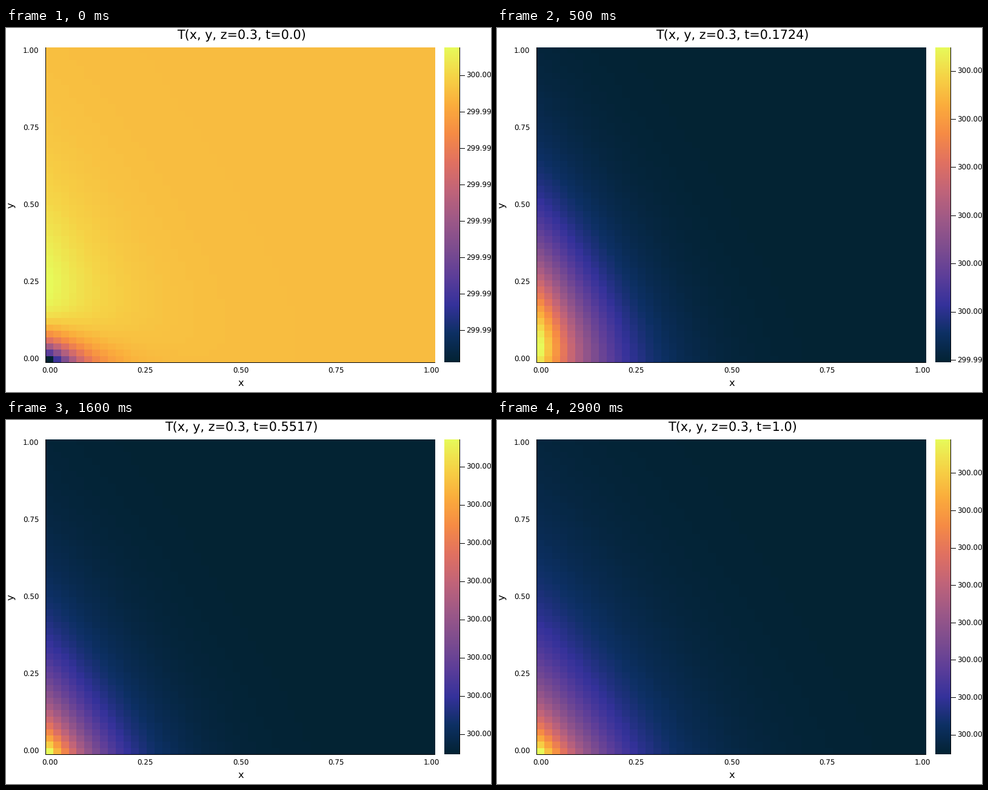
Animation, 800 px wide and 600 px high, one loop 3000 ms. Source, as a matplotlib script:

```python
import numpy as np
import matplotlib.pyplot as plt
from matplotlib.animation import FuncAnimation
from matplotlib.colors import LinearSegmentedColormap

W, H, DPI = 800, 600, 100
FRAMES, CELLS = 30, 50
LEFT, RIGHT, TOP, BOTTOM = 65, 708, 32, 551
BAR_LEFT, BAR_RIGHT = 723, 748

plt.rcParams["font.family"] = "DejaVu Sans"
plt.rcParams["text.hinting"] = "no_hinting"
THERMAL = LinearSegmentedColormap.from_list("thermal", [
    "#032333", "#0d3064", "#35329b", "#5d3e99", "#7e4d8f", "#9e5987",
    "#c16479", "#e17161", "#f68b45", "#fbad3c", "#f6d346", "#e7fa5a"])

# Colorbar ticks: pixel row of the lowest "300.00" tick and tick spacing
KEY_STEPS = [0, 2, 5, 11, 16, 24, 29]
KEY_ROWS = [78, 220, 468, 512, 518, 520, 519]
KEY_GAPS = [60.1, 71.9, 79.4, 74.1, 63, 59.8, 61.6]

grid = np.linspace(0, 1, CELLS)
X, Y = np.meshgrid(grid, grid)


def radius(kx, ky, p=1.14):
    return ((kx * X) ** p + (ky * Y) ** p) ** (1 / p)


def temperature(t):
    """Broad warm zone minus a cold corner that fades, scaled to 0..1."""
    spread = t ** 1.5
    cold = 2.43 * np.exp(-5.9 * t) - 0.35
    warm = np.exp(-radius(9.1 - 3.1 * spread, 4.8 - 1.3 * spread))
    field = warm - cold * np.exp(-radius(11.5, 11.5))
    return (field - field.min()) / np.ptp(field)


fig = plt.figure(figsize=(W / DPI, H / DPI), dpi=DPI, facecolor="white")
ax = fig.add_axes([0, 0, 1, 1])
ax.axis("off")


def text(x, y, s, px, **kw):
    return ax.text(x, y, s, fontsize=px * 72 / DPI, color="black",
                   va="baseline", **kw)


def line(xs, ys):
    return ax.plot(xs, ys, color="black", lw=0.72, snap=False,
                   solid_capstyle="butt")[0]


def image(data, left, right):
    return ax.imshow(data, cmap=THERMAL, vmin=0, vmax=1, origin="lower",
                     extent=(left, right, BOTTOM, TOP), aspect="auto",
                     interpolation="nearest")


heat = image(temperature(0), LEFT, RIGHT)
image(np.linspace(0, 1, 256)[:, None], BAR_LEFT, BAR_RIGHT)
ax.set_xlim(0, W)
ax.set_ylim(H, 0)

line([65.5, 65.5], [TOP, BOTTOM + 1])
line([LEFT, RIGHT], [551.5, 551.5])
line([748.5, 748.5], [TOP, BOTTOM])

for v in np.linspace(0, 1, 5):
    text(72.2 + 629.6 * v, 569, f"{v:.2f}", 11.9, ha="center")
    text(54.5, 550.3 - 508 * v, f"{v:.2f}", 11.9, ha="right")
text(387, 590.5, "x", 16.35, ha="center")
text(13, 292, "y", 16.35, ha="center", rotation=90, rotation_mode="anchor")
title = text(388, 18.5, "", 20.8, ha="center")

ticks = [(line([748, 757], [0, 0]), text(759, 0, "", 11.9, ha="left"))
         for _ in range(10)]


def update(i):
    t = i / (FRAMES - 1)
    heat.set_data(temperature(t))
    title.set_text(f"T(x, y, z=0.3, t={round(t, 4)})")

    base = np.interp(i, KEY_STEPS, KEY_ROWS)
    gap = np.interp(i, KEY_STEPS, KEY_GAPS)
    first = int(np.ceil((base - BOTTOM) / gap))
    for n, (mark, label) in enumerate(ticks, first):
        y = base - n * gap
        shown = TOP <= y <= BOTTOM
        mark.set_visible(shown)
        label.set_visible(shown)
        row = np.floor(y) + 0.5
        mark.set_ydata([row, row])
        label.set_y(y + 4.3)
        label.set_text("300.00" if n >= 0 else "299.99")
    return []


anim = FuncAnimation(fig, update, frames=FRAMES, interval=100,
                     repeat=True, repeat_delay=0)
plt.show()
```
